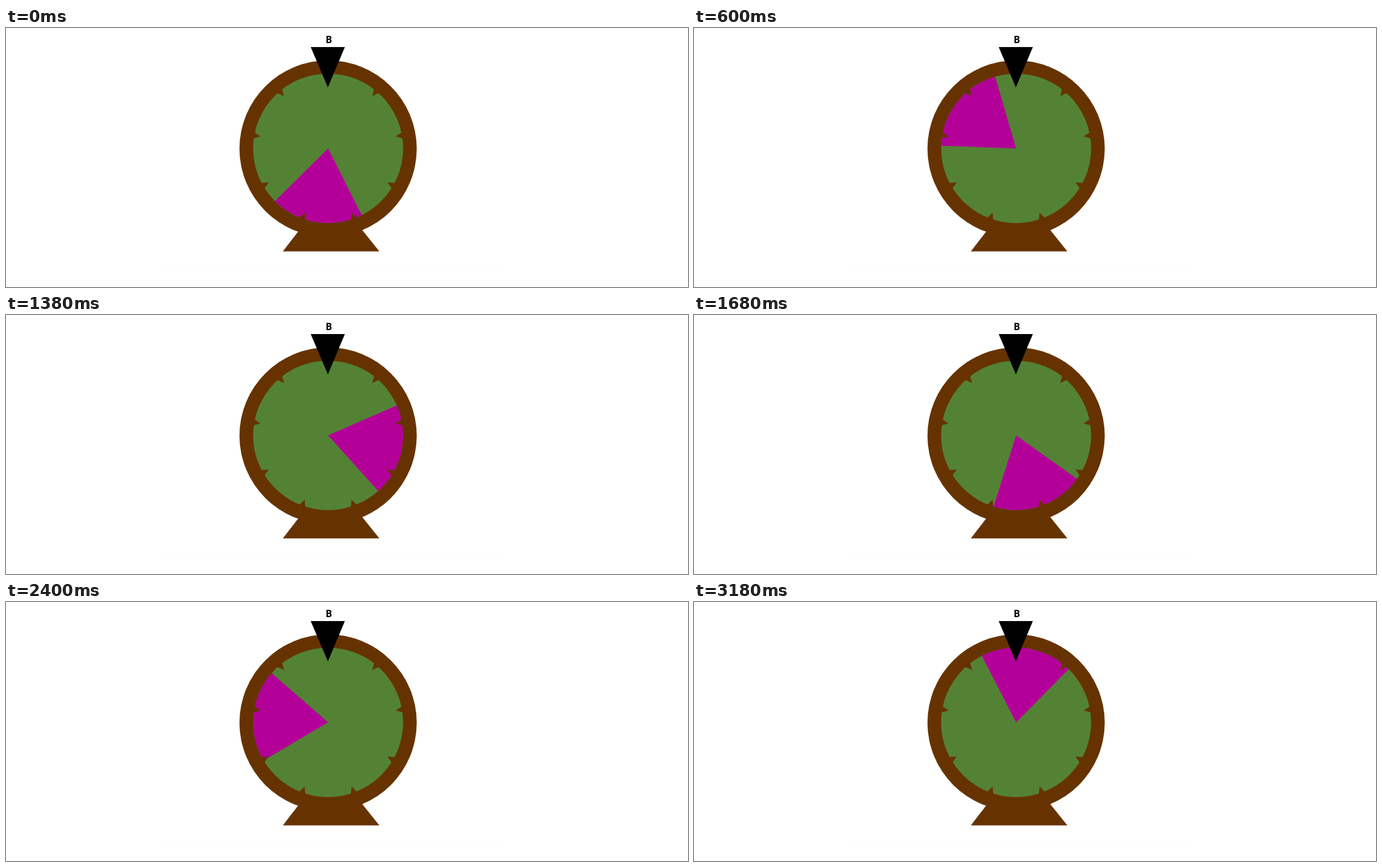
Recreate the animation shown at these times as an HTML page. Size 1212 by 462 pixels, loop 3240 ms.

```html
<!DOCTYPE html>
<html lang="en">
<head>
<meta charset="utf-8">
<title>Spinning wheel</title>
<style>
  html, body { margin: 0; width: 100%; height: 100%; overflow: hidden; background: #fff; }
  svg { display: block; width: 100%; height: 100%; }
  text { font: bold 17px "Noto Sans", "Open Sans", sans-serif; text-anchor: middle; }
</style>
</head>
<body>
<svg viewBox="0 0 1212 462">
  <path d="M267 433.5H889" stroke="#fbfbfb"/>
  <g fill="#663300">
    <path d="M492 398.5L530 349H624L663.5 398.5Z"/>
    <circle cx="572.4" cy="215.3" r="157.5"/>
  </g>
  <g transform="translate(572.4 214.7)">
    <circle r="133.3" fill="#548235"/>
    <path id="wedge" fill="#b30098"/>
    <g id="teeth" fill="#663300"></g>
  </g>
  <path d="M541.5 34H602.2L572 106Z"/>
  <text x="573.8" y="27">B</text>
</svg>
<script>
  const STEP = 60, LOOP = 3240, RADIUS = 133.3;
  const START = 189.2, SPAN = 71.8;
  const FAST = 11.87, SLOW = 8.9;           // degrees per step
  const TURN = 360 / FAST, BRAKE = 48, STOP = 53;

  const wedge = document.getElementById("wedge");
  const teeth = document.getElementById("teeth");

  const half = SPAN / 2 * Math.PI / 180;
  const x = RADIUS * Math.sin(half), y = -RADIUS * Math.cos(half);
  wedge.setAttribute("d", `M0 0L${-x} ${y}A${RADIUS} ${RADIUS} 0 0 1 ${x} ${y}Z`);

  for (let angle = 40; angle <= 320; angle += 40) {
    const tooth = document.createElementNS(teeth.namespaceURI, "path");
    tooth.setAttribute("d", "M-5.6 -134L0 -121.8L5.6 -134Z");
    tooth.setAttribute("transform", `rotate(${angle})`);
    teeth.append(tooth);
  }

  // One quick full turn, then a slower half turn that brakes at its end.
  function travelled(step) {
    if (step < TURN) return step * FAST;
    const cruise = 360 + (Math.min(step, BRAKE) - TURN) * SLOW;
    const braking = Math.min(Math.max(step - BRAKE, 0), STOP - BRAKE);
    return cruise + SLOW * (braking - braking ** 2 / (2 * (STOP - BRAKE)));
  }

  function draw() {
    const step = Math.floor(performance.now() % LOOP / STEP);
    wedge.setAttribute("transform", `rotate(${START + travelled(step)})`);
    requestAnimationFrame(draw);
  }
  draw();
</script>
</body>
</html>
```
